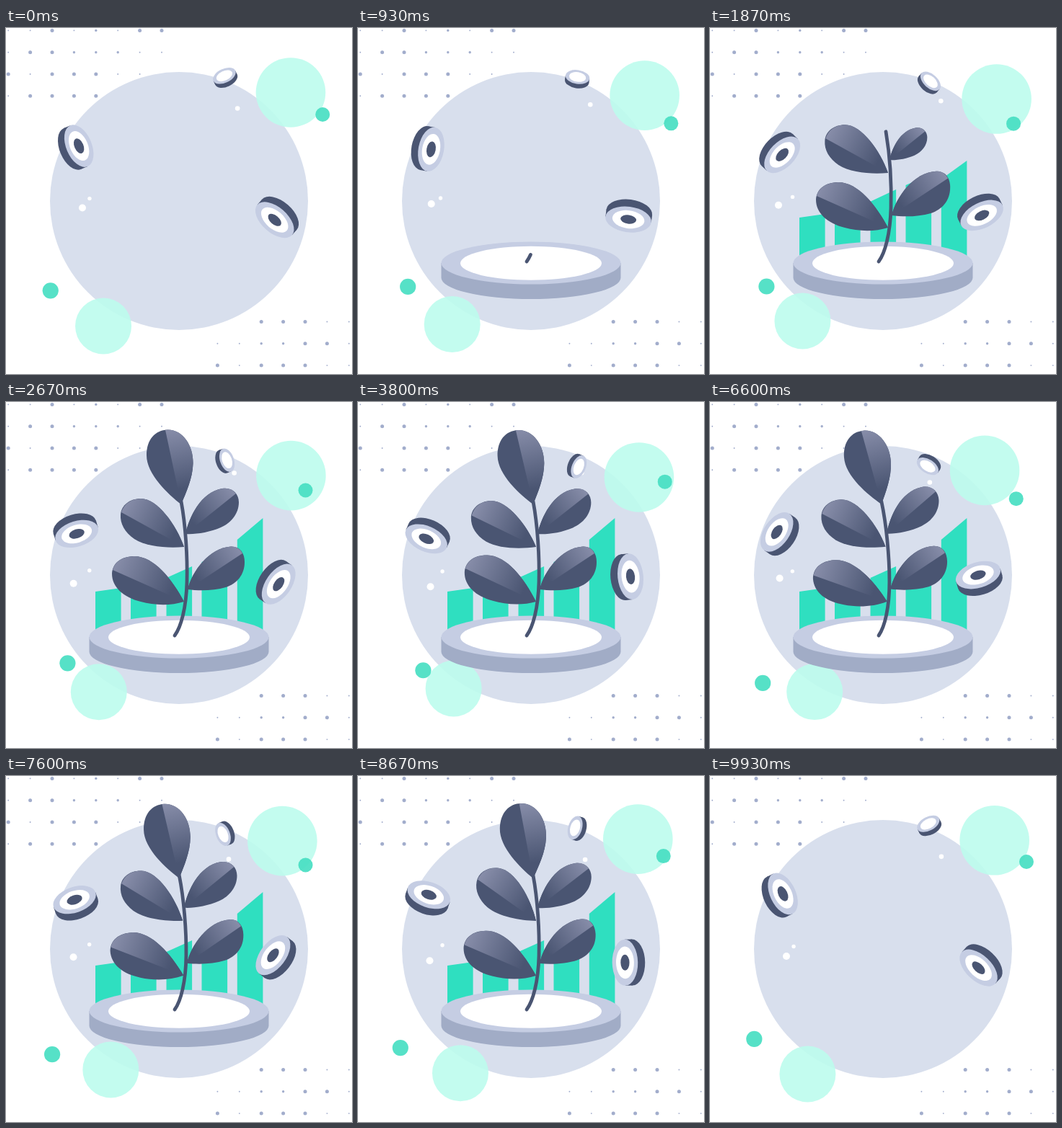
Recreate the animation shown at these times as an HTML page. Size 480 by 480 pixels, loop 9990 ms.

```html
<!DOCTYPE html>
<html lang="en">
<head>
<meta charset="utf-8">
<title>Growing plant</title>
<style>
  html, body { margin: 0; width: 100%; height: 100%; overflow: hidden; background: #fff; }
  svg { display: block; width: 100%; height: 100%; }
</style>
</head>
<body>
<svg id="stage" viewBox="0 0 480 480">
  <g id="grid" fill="#a2adcc"></g>
  <circle cx="240" cy="240" r="179" fill="#d8dfed"/>
  <g id="orbs"></g>
  <g id="bars" fill="#2fdfc0"></g>
  <g id="base">
    <path d="M115.5 326V346.5A124.5 29.5 0 0 0 364.5 346.5V326Z" fill="#a1acc6"/>
    <ellipse cx="240" cy="326" rx="124.5" ry="29.5" fill="#c5cde3"/>
    <ellipse cx="240" cy="326.3" rx="98" ry="23.5" fill="#fff"/>
  </g>
  <g id="plant">
    <g id="leaves"></g>
    <path id="stem" d="M234 324C243 312 250 285 251 250C252 215 249 170 243 138" pathLength="1"
      fill="none" stroke="#4a5572" stroke-width="4.8" stroke-linecap="round"/>
  </g>
  <g id="coins"></g>
</svg>
<script>
const LOOP = 9990, STEP = 1000 / 15, TURN = 36;
const NAVY = '#4a5572';
const $ = id => document.getElementById(id);

function add(parent, tag, attrs) {
  const el = document.createElementNS('http://www.w3.org/2000/svg', tag);
  for (const key in attrs) el.setAttribute(key, attrs[key]);
  return parent.appendChild(el);
}

const clamp = v => Math.min(1, Math.max(0, v));
const part = (s, from, to) => clamp((s - from) / (to - from));
const smooth = u => u * u * (3 - 2 * u);
const backIn = (u, k = 1.2) => u * u * ((k + 1) * u - k);
const backOut = u => 1 - backIn(1 - u);
const rad = deg => deg * Math.PI / 180;

// Rises during [a, b] and falls during [c, d]
const grow = (s, a, b, c, d) =>
  s < c ? backOut(part(s, a, b)) : 1 - backIn(part(s, c, d));

function scaleAt(el, x, y, sx, sy = sx, turn = 0) {
  const hide = sx <= 0.001 || sy <= 0.001;
  el.setAttribute('visibility', hide ? 'hidden' : 'visible');
  el.setAttribute('transform',
    `translate(${x} ${y}) rotate(${turn}) scale(${sx} ${sy}) translate(${-x} ${-y})`);
}

// Dot grids: each digit is a size class
const SIZES = [0, 0.95, 1.7, 2.5];
function dots(x, y, rows) {
  rows.forEach((row, j) => [...row].forEach((n, i) => {
    if (+n) add($('grid'), 'circle', { cx: x + i * 30.4, cy: y + j * 30.3, r: SIZES[n] });
  }));
}
dots(3.2, 3.4, ['11312133', '13322211', '3133311', '13333']);
dots(293.4, 407.5, ['0033311', '1122331', '3133311']);

// Circles on round paths: centre, path radius, start angle, degrees per second
const orbs = [
  { x: 389.5, y: 96, d: 8.5, a: -50, w: TURN, r: 48.3, fill: '#bdfcee', o: 0.9 },
  { x: 137, y: 405, d: 8.7, a: 103, w: TURN, r: 39, fill: '#bdfcee', o: 0.9 },
  { x: 427.5, y: 122.5, d: 12, a: -12, w: 2 * TURN, r: 10, fill: '#48dec2', o: 0.92 },
  { x: 74.5, y: 374, d: 16, a: 217, w: TURN, r: 11.1, fill: '#48dec2', o: 0.92 },
  { x: 313, y: 107, d: 9.3, a: 29, w: -TURN, r: 3.3, fill: '#fff', o: 1 },
  { x: 99.7, y: 250, d: 6.3, a: -4, w: -2 * TURN, r: 5, fill: '#fff', o: 1 },
  { x: 115.7, y: 235.2, d: 1.4, a: 80, w: 2 * TURN, r: 2.7, fill: '#fff', o: 1 }
];
for (const o of orbs) {
  o.el = add($('orbs'), 'circle', { r: o.r, fill: o.fill, 'fill-opacity': o.o });
}

// Tumbling discs: local +x is the direction the face looks in
const coins = [
  { x: 96.7, y: 177, bob: -11.5, sway: 0, a: -23, w: TURN, rx: 17.7, ry: 30.9, t: 9.7, mark: 1 },
  { x: 374.3, y: 251, bob: 11.5, sway: 1.7, a: 131, w: -TURN, rx: 17.8, ry: 32, t: 10, mark: 1 },
  { x: 303.8, y: 80.5, bob: -11.5, sway: 0.4, a: -115, w: TURN, rx: 9.6, ry: 16.8, t: 6 }
];
for (const c of coins) {
  const g = c.el = add($('coins'), 'g', {}), h = c.t / 2;
  const disc = (cx, k, fill) =>
    add(g, 'ellipse', { cx, rx: c.rx * k, ry: c.ry * k, fill });
  disc(-h, 1, NAVY);
  add(g, 'rect', { x: -h, y: -c.ry, width: c.t, height: 2 * c.ry, fill: NAVY });
  disc(h, 1, '#c5cde3');
  disc(h, 0.7, '#fff');
  if (c.mark) {
    add(g, 'circle', { r: 11, fill: NAVY, transform: `translate(${h} 0) scale(${c.rx / c.ry} 1)` });
  }
}

// Bars: left edge, top left, top right
const bars = [[124, 263, 258], [173, 254, 249], [222.5, 244, 228], [271.5, 222, 207], [320.8, 191, 161]]
  .map(([x, l, r]) => add($('bars'), 'path', { d: `M${x} 326V${l}L${x + 35.6} ${r}V326Z` }));

// Leaves: tip, far end, outline, lit half, birth, end, and tilt at the POSE times
const POSE = [2.667, 5, 6.6, 8.667];
const leaves = [
  { tip: [247, 277], far: [148, 233], born: 1.3, end: 8.82, tilt: [0, 2.5, -2.9, -0.7],
    d: 'C228 283 205 282 187 277C163 271 147 257 147 238C148 223 160 214 178 214C205 214 230 245 247 277Z',
    lit: 'C230 245 205 214 178 214Q153 215 148 233Z' },
  { tip: [252, 260], far: [328, 211], born: 1.42, end: 8.79, tilt: [0, 0, 1.4, -2],
    d: 'C258 235 282 202 312 200.5C324 200 331 209 331 222C331 240 320 252 305 257C288 262 268 262 252 260Z',
    lit: 'C258 235 282 202 312 200.5Q323 200 328 210Z' },
  { tip: [247, 201], far: [160, 153], born: 1.62, end: 8.75, tilt: [0, -6, 0.1, 6.5],
    d: 'C225 203 195 201 178 190C165 181 158 169 159 156C160 143 172 134 187 134C210 134 236 170 247 201Z',
    lit: 'C236 170 210 134 187 134Q166 135 160 153Z' },
  { tip: [249, 183], far: [319, 128], born: 1.74, end: 8.72, tilt: [0, 1, -0.4, 1],
    d: 'C254 160 270 125 300 120C314 118 323 127 323 139C323 155 312 168 298 174C282 181 262 184 249 183Z',
    lit: 'C254 160 270 125 300 120Q312 118 319 127Z' },
  { tip: [243, 142], far: [221, 39], born: 2, end: 8.67, tilt: [0, -2.5, -1.8, 1.5],
    d: 'C225 128 195 100 195 74C195 52 207 39 224 38.5C245 38 260 60 259.5 85C259 106 250 125 243 142Z',
    lit: 'C250 125 259 106 259.5 85C260 60 245 38 224 38.5L221 38.8Z' }
];
const defs = add($('stage'), 'defs', {});
leaves.forEach((leaf, i) => {
  const [x, y] = leaf.tip, [fx, fy] = leaf.far, id = 'shine' + i;
  const fade = add(defs, 'linearGradient',
    { id, gradientUnits: 'userSpaceOnUse', x1: fx, y1: fy, x2: x, y2: y });
  add(fade, 'stop', { offset: 0, 'stop-color': '#878da9' });
  add(fade, 'stop', { offset: 0.8, 'stop-color': NAVY });
  leaf.el = add($('leaves'), 'g', {});
  add(leaf.el, 'path', { d: `M${x} ${y}${leaf.d}`, fill: NAVY });
  add(leaf.el, 'path', { d: `M${x} ${y}${leaf.lit}`, fill: `url(#${id})` });
});

function pose(s, values) {
  let v = values[0];
  for (let i = 1; i < POSE.length; i++) {
    v += (values[i] - values[i - 1]) * smooth(part(s, POSE[i - 1], POSE[i]));
  }
  return v;
}

function draw(s) {
  for (const o of orbs) {
    const a = rad(o.a + o.w * s);
    o.el.setAttribute('cx', o.x + o.d * Math.cos(a));
    o.el.setAttribute('cy', o.y + o.d * Math.sin(a));
  }
  const swing = Math.cos(rad(TURN * s));
  for (const c of coins) {
    c.el.setAttribute('transform',
      `translate(${c.x + c.sway * swing} ${c.y + c.bob * swing}) rotate(${c.a + c.w * s})`);
  }
  scaleAt($('base'), 240, 336, grow(s, 0.07, 0.8, 9.4, 9.9));
  bars.forEach((bar, i) => {
    const t = i * 0.14;
    scaleAt(bar, 240, 326, 1, grow(s, 1.1 + t, 1.75 + t, 8.9 + t / 3, 9.4 + t / 3));
  });
  const length = smooth(part(s, 0.75, 2)) * (1 - smooth(part(s, 9.1, 9.6)));
  $('stem').setAttribute('stroke-dasharray', `${length} 2`);
  $('stem').setAttribute('visibility', length > 0.001 ? 'visible' : 'hidden');
  $('plant').setAttribute('transform', `rotate(${pose(s, [0, 0, -1.6, 0])} 234 324)`);
  for (const leaf of leaves) {
    const size = grow(s, leaf.born, leaf.born + 0.55, leaf.end, leaf.end + 0.6);
    scaleAt(leaf.el, ...leaf.tip, size, size, pose(s, leaf.tilt));
  }
}

function tick(now) {
  draw(Math.floor((now % LOOP + 5) / STEP) / 15);
  requestAnimationFrame(tick);
}
draw(0);
requestAnimationFrame(tick);
</script>
</body>
</html>
```
